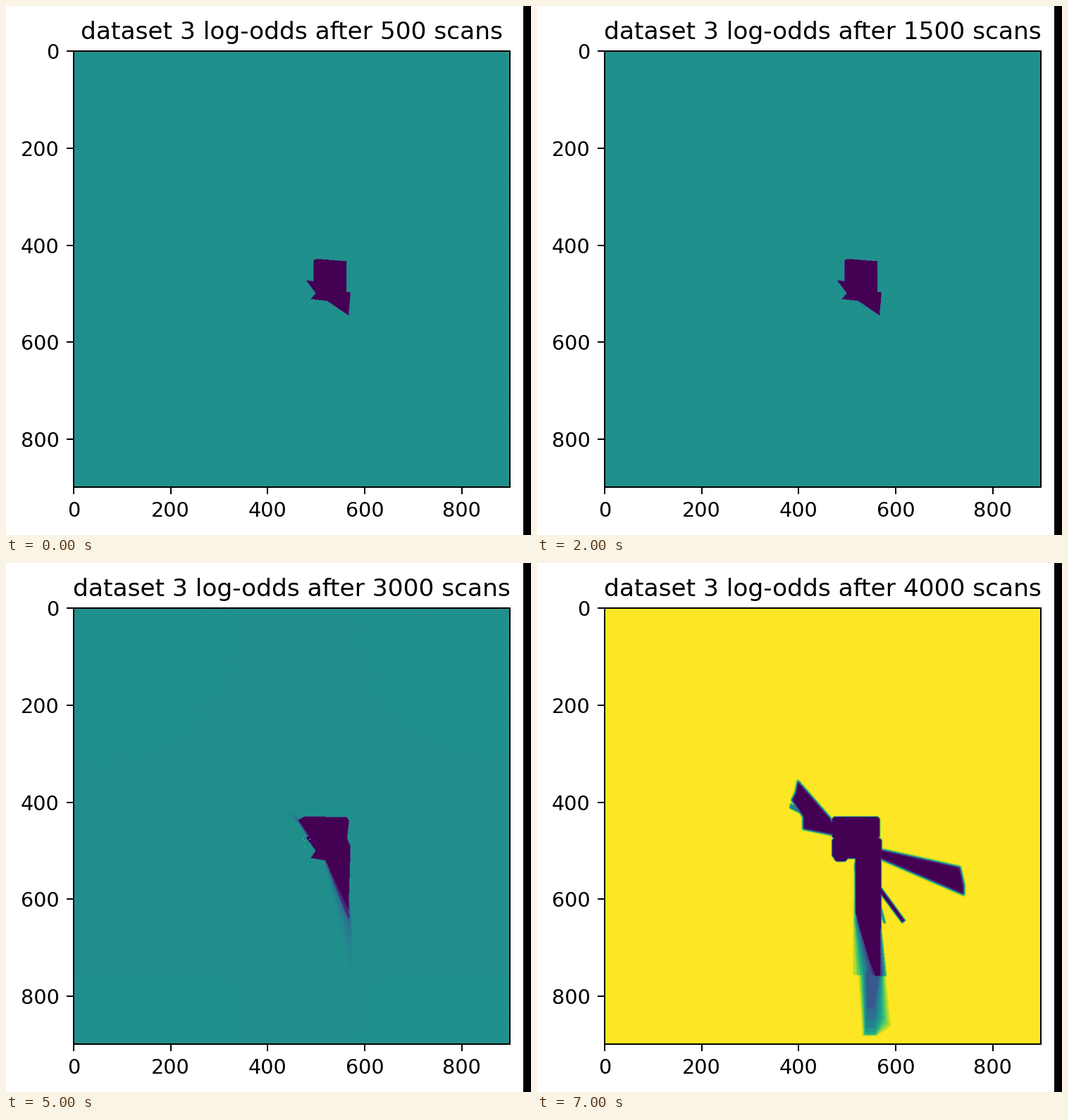
These frames come from a looping animation (745x751 px, 8 s). A matplotlib script:

```python
import matplotlib.pyplot as plt
import numpy as np
from matplotlib.animation import FuncAnimation
from matplotlib.patches import Rectangle
from matplotlib.path import Path

W, H, DPI = 745, 751, 200
LEFT, TOP, SIDE = 95.6, 63.9, 619.4   # map area on the stage
N = 900                               # grid cells per side
FRAMES = 8


def fill(points):
    poly = np.array(points, float) + (0, 2)
    x0, y0 = np.floor(poly.min(axis=0)).astype(int)
    x1, y1 = np.ceil(poly.max(axis=0)).astype(int) + 1
    gx, gy = np.meshgrid(np.arange(x0, x1), np.arange(y0, y1))
    inside = Path(poly).contains_points(np.c_[gx.ravel(), gy.ravel()])
    mask = np.zeros((N, N))
    mask[y0:y1, x0:x1] = inside.reshape(gx.shape)
    return mask


def soften(mask, sx, sy):
    fx = np.fft.rfftfreq(N)[None, :]
    fy = np.fft.fftfreq(N)[:, None]
    gauss = np.exp(-2 * np.pi**2 * ((sx * fx)**2 + (sy * fy)**2))
    return np.clip(np.fft.irfft2(np.fft.rfft2(mask) * gauss, s=(N, N)), 0, 1)


def build(bg, layers):
    """Layers are (points, level, blur x, blur y); the lowest value wins."""
    grid = np.full((N, N), float(bg))
    for points, level, sx, sy in layers:
        mask = fill(points)
        if sx:
            mask = soften(mask, sx, sy)
        grid = np.minimum(grid, bg + (level - bg) * mask)
    return grid


def area(points, level=0, sx=0.0, sy=None):
    return points, level, sx, sx if sy is None else sy


def box(x0, y0, x1, y1, cut=5):
    """Free block with its corners cut off."""
    return [(x0 + cut, y0), (x1 - cut, y0), (x1, y0 + cut), (x1, y1 - cut),
            (x1 - cut, y1), (x0 + cut, y1), (x0, y1 - cut), (x0, y0 + cut)]


def turning():
    """The view swings round: streaks fade out as they get longer."""
    layers = [area([(462, 436), (475, 428), (562, 430), (567, 437), (563, 474),
                    (570, 490), (566, 620), (518, 519), (488, 514), (498, 499),
                    (478, 472), (485, 468)])]
    for t in np.linspace(0, 1, 6):
        level = 0.1 + 0.37 * t**0.5
        layers.append(area([(516 - 2 * t, 518), (566, 600 - 20 * t),
                            (569 + 7 * t, 645 + 110 * t**2),
                            (562 + 8 * t, 635 + 110 * t**2)], level, 1.5))
        layers.append(area([(462 - 34 * t**2, 438 - 34 * t**2), (472, 436),
                            (488, 470), (482, 470)], level, 1.2))
    return layers


def corridor():
    """Long hallway below the room, fading outwards and downwards."""
    layers = [area([(515, 514), (570, 500), (569, 660), (562, 758), (556, 758),
                    (543, 724), (524, 660), (516, 628)], 0, 0.8)]
    for t in np.linspace(0, 1, 8):
        layers.append(area([(514, 520), (511 + 10 * t, 645), (511 + 24 * t, 690),
                            (512 + 44 * t, 755), (563, 755), (567, 640)],
                           0.88 * (1 - t), 1.2, 0.4))
        layers.append(area([(560, 640), (568, 645), (574 - 6 * t, 700),
                            (580 - 12 * t, 757), (555, 757)], 0.6 * (1 - t), 1, 0.6))
        low = 880 - 55 * t**4
        layers.append(area([(522 + 14 * t, 745), (577 - 8 * t, 745),
                            (588 - 32 * t, 860 - 30 * t), (560 - 4 * t, low),
                            (531 + 7 * t, low)], 0.88 - 0.6 * t, 1.2, 0.5))
    return layers


def explored(arm, beam, *extra):
    """Room and corridor with one far arm and one beam to the right."""
    return corridor() + [
        area(box(468, 428, 566, 475), 0, 0.8),
        area(box(468, 472, 570, 515), 0, 0.8),
        area([(566, 570), (619, 643), (612, 648), (566, 586)], 0, 1.2),
        area([(568, 608), (579, 648), (574, 648), (566, 625)], 0.5, 1),
        area(arm, 0, 1.8),
        area(beam, 0, 2),
        *extra,
    ]


start = [area([(494, 430), (500, 427), (562, 432), (561, 495), (570, 495),
               (566, 544), (522, 514), (488, 510), (498, 498), (478, 471),
               (493, 473)])]

arm_a = [(397, 353), (464, 430), (488, 470), (413, 409), (415, 401), (393, 385)]
arm_b = [(397, 353), (464, 430), (488, 471), (407, 455), (408, 430), (384, 395),
         (392, 378)]
beam_a = [(566, 501), (730, 534), (728, 558), (733, 582), (566, 516)]
beam_b = [(566, 495), (732, 532), (740, 568), (740, 591), (566, 516)]
strip = area([(382, 401), (405, 413), (403, 423), (380, 411)], 0.42, 1)

early = build(0.5, start)
turn = build(0.5, turning())
rng = np.random.default_rng(3)
for x, y in rng.integers((472, 476), (490, 496), (5, 2)):
    turn[y:y + 2, x:x + 2] = 0.75
maps = [early, early, early, build(0.53, start), build(0.52, start), turn,
        build(1, explored(arm_a, beam_a)),
        build(1, explored(arm_b, beam_b, strip,
                          area(box(472, 500, 500, 521), 0, 0.8)))]

zoom = 1.03
plt.rcParams.update({
    "font.family": "DejaVu Sans",
    "font.size": 10 * zoom,
    "axes.titlesize": 12 * zoom,
    "axes.titlepad": 6 * zoom,
    "axes.linewidth": 0.72,
})
for axis in ("xtick", "ytick"):
    plt.rcParams.update({f"{axis}.major.size": 3.5 * zoom,
                         f"{axis}.major.width": 0.72,
                         f"{axis}.major.pad": 3.5 * zoom})

fig = plt.figure(figsize=(W / DPI, H / DPI), dpi=DPI, facecolor="white")
ax = fig.add_axes([LEFT / W, 1 - (TOP + SIDE) / H, SIDE / W, SIDE / H])
image = ax.imshow(maps[0], cmap="viridis", vmin=0, vmax=1, aspect="auto")
ax.set_xticks(range(0, N, 200))
ax.set_yticks(range(0, N, 200))
title = ax.set_title("")
fig.add_artist(Rectangle((734 / W, 0), 11 / W, 1, transform=fig.transFigure,
                         color="black", lw=0))


def update(i):
    image.set_data(maps[i])
    title.set_text(f"dataset 3 log-odds after {500 * (i + 1)} scans")
    return image, title


anim = FuncAnimation(fig, update, frames=FRAMES, interval=1000, repeat=True,
                     repeat_delay=0, blit=False)
plt.show()
```
